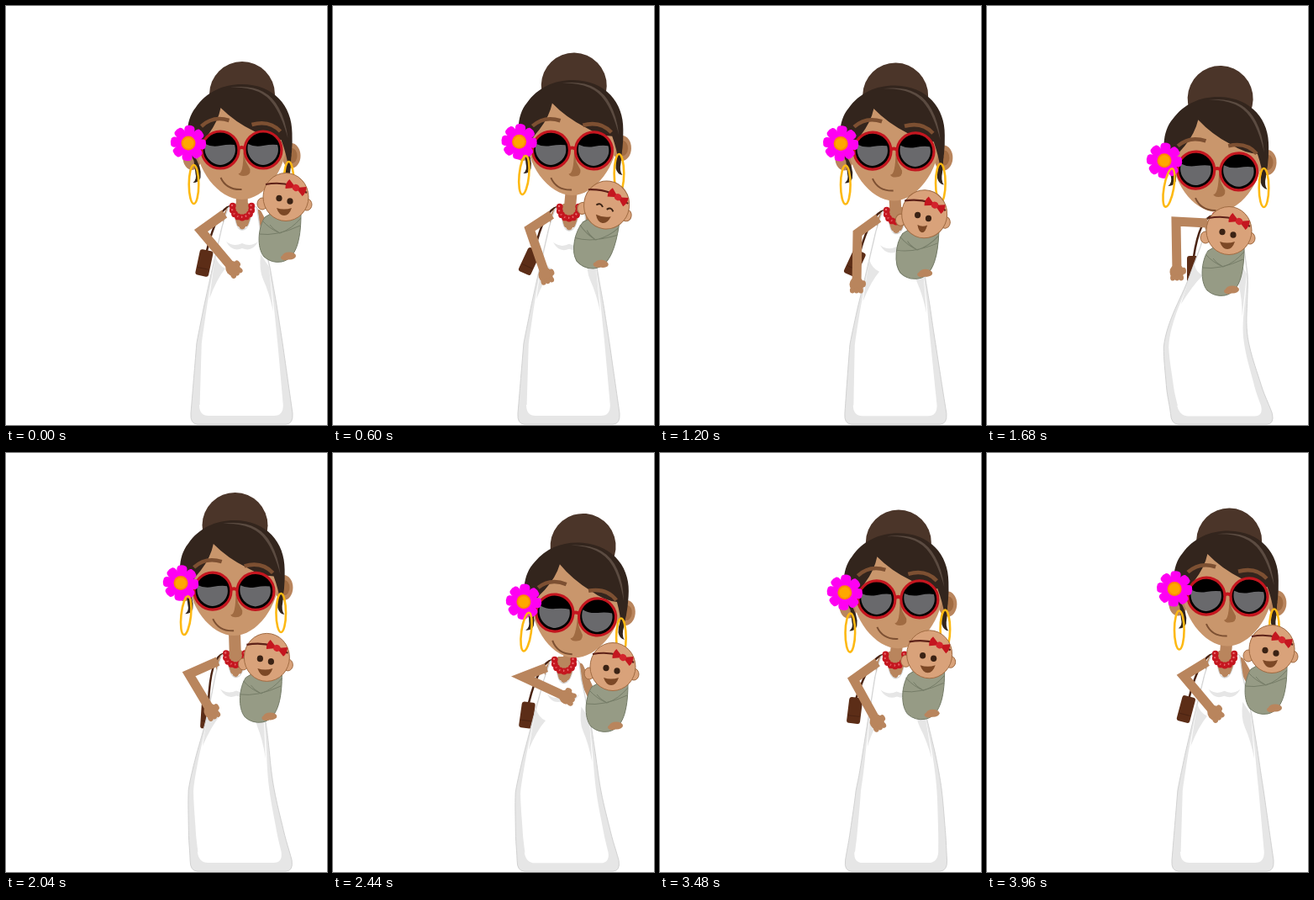
Write an HTML page with a canvas that moves like this. It is 382x498 px and loops after 4 s.

```html
<!DOCTYPE html>
<html lang="en">
<head>
<meta charset="utf-8">
<title>Dancing mother and baby</title>
<style>
  html, body { margin: 0; width: 100%; height: 100%; overflow: hidden; background: #fff; }
  canvas { display: block; }
</style>
</head>
<body>
<canvas id="stage" width="382" height="498"></canvas>
<script>
const ctx = document.getElementById('stage').getContext('2d');
const LOOP = 4000, STEP = 40, RAD = Math.PI / 180;

const SKIN = '#c9966c', ARM = '#b9855d', SHADE = '#a06b42', BROW = '#7d5032';
const HAIR = '#33251d', BUN = '#4b3529', RED = '#c4161f', GOLD = '#fdb913';
const GREY = '#e6e6e6', EDGE = '#d2d2d2', BAG = '#5c2d17', BABY = '#d9a27a';

// time, eyes x, eyes y, tilt, nod
const headKeys = loop([
  [0, 280.5, 171, 0, 0], [100, 279, 172, 0, 0], [600, 285, 171.5, 1, 5.5],
  [880, 300, 172, 2, 3], [1200, 278.5, 172.5, 1, 0], [1440, 264, 180, 1, 5],
  [1680, 274.5, 196, 2, 10], [1960, 270, 162, 0, 6], [2440, 290, 192.5, 5.5, 8],
  [2700, 282, 172, 3, 4], [3040, 248, 172, 4.5, 0], [3220, 262, 166, 2, 4],
  [3400, 280, 174, 0, 1], [3800, 291, 172, 0, 0], [3960, 286.5, 170.5, 1, 0]
]);
// time, shoulder dx, shoulder dy, waist dx, hip dx
const bodyKeys = loop([
  [0, 0, 0, 0, 0], [600, 0, 1, 0, 0], [880, 14, 0, 5, 4], [1200, 0, 5, 0, -1],
  [1440, -8, 8, -5, -6], [1680, 2, 11, -4, -17], [1960, -8, 0, -6, -10],
  [2440, -6, 8, -8, -10], [2700, -10, 3, 0, 2], [3040, -32, 3, 5, 17],
  [3400, -4, 2, 3, 8], [3800, 5, 1, 1, 1], [3960, 2, 1, 1, 0]
]);
// time, x, y, tilt
const babyKeys = loop([
  [0, 326, 275, 0], [600, 312, 283, 8], [880, 343, 278, 2], [1200, 306, 295, 2],
  [1440, 292, 305, 0], [1680, 281, 315, 0], [1960, 298, 290, 0], [2440, 326, 302, 0],
  [2700, 300, 295, 0], [3040, 257, 302, 0], [3400, 305, 290, 0], [3800, 338, 279, 0],
  [3960, 332, 281, 0]
]);
// time, elbow x, elbow y, hand x, hand y
const armKeys = loop([
  [0, 232, 267, 270, 312], [600, 234, 265, 253, 320], [880, 248, 268, 258, 322],
  [1200, 235, 270, 234, 331], [1440, 218, 268, 222, 330], [1680, 225, 256, 226, 316],
  [1960, 217, 262, 238, 310], [2440, 226, 266, 278, 290], [2700, 217, 272, 262, 310],
  [3040, 207, 276, 230, 332], [3400, 229, 270, 255, 322], [3960, 234, 265, 271, 309]
]);
// time, x, y, tilt
const bagKeys = loop([
  [0, 236, 305, 12], [600, 234, 303, 25], [1200, 232, 305, 25], [1680, 246, 312, 0],
  [2440, 231, 311, 8], [3040, 227, 308, 0], [3960, 237, 304, 15]
]);
const leftEdge = [[240, 264], [262, 257], [310, 246], [355, 236], [400, 227], [484, 220]];
const rightEdge = [[240, 299], [262, 302], [310, 314], [355, 322], [400, 329], [484, 341]];

function loop(rows) {
  const shift = (row, by) => [row[0] + by, ...row.slice(1)];
  return [...rows.slice(-2).map(r => shift(r, -LOOP)), ...rows,
          ...rows.slice(0, 2).map(r => shift(r, LOOP))];
}

// Cubic through the keys that never overshoots.
function sample(rows, t, col) {
  const last = rows.length - 1;
  if (t <= rows[0][0]) return rows[0][col];
  if (t >= rows[last][0]) return rows[last][col];
  let i = 0;
  while (rows[i + 1][0] <= t) i++;
  const slope = k => (rows[k + 1][col] - rows[k][col]) / (rows[k + 1][0] - rows[k][0]);
  const tangent = k => {
    if (k < 1 || k >= last) return 0;
    const a = slope(k - 1), b = slope(k);
    return a * b <= 0 ? 0 : 2 * a * b / (a + b);
  };
  const w = rows[i + 1][0] - rows[i][0], u = (t - rows[i][0]) / w, v = 1 - u;
  return rows[i][col] * v * v * (1 + 2 * u) + rows[i + 1][col] * u * u * (3 - 2 * u)
       + w * u * v * (tangent(i) * v - tangent(i + 1) * u);
}
const pose = (rows, t) => rows[0].slice(1).map((_, i) => sample(rows, t, i + 1));

function paint(fill, stroke, width = 1) {
  if (fill) { ctx.fillStyle = fill; ctx.fill(); }
  if (stroke) { ctx.strokeStyle = stroke; ctx.lineWidth = width; ctx.stroke(); }
}
function oval(x, y, rx, ry, fill, stroke, width, tilt = 0) {
  ctx.beginPath();
  ctx.ellipse(x, y, rx, ry, tilt * RAD, 0, 7);
  paint(fill, stroke, width);
}
function shape(d, fill, stroke, width) {
  const p = new Path2D(d);
  if (fill) { ctx.fillStyle = fill; ctx.fill(p); }
  if (stroke) { ctx.strokeStyle = stroke; ctx.lineWidth = width; ctx.stroke(p); }
}
function line(points, color, width) {
  ctx.beginPath();
  points.forEach(p => ctx.lineTo(...p));
  paint(null, color, width);
}
function at(x, y, tilt, draw) {
  ctx.save();
  ctx.translate(x, y);
  ctx.rotate(tilt * RAD);
  draw();
  ctx.restore();
}

function edgeX(edge, y) {
  let i = 0;
  while (i < edge.length - 2 && edge[i + 1][0] < y) i++;
  const [y0, x0] = edge[i], [y1, x1] = edge[i + 1];
  return x0 + (x1 - x0) * (y - y0) / (y1 - y0);
}

function drawDress([n, ny, waist, hip]) {
  const bend = [[245, n], [310, waist], [390, hip], [450, hip * .55], [498, 0]];
  const P = (x, y) => [x + sample(bend, y, 1), y + ny * Math.min(1, (498 - y) / 250)];
  const to = (x, y) => ctx.lineTo(...P(x, y));
  const quad = (cx, cy, x, y) => ctx.quadraticCurveTo(...P(cx, cy), ...P(x, y));
  const side = (edge, from, end, inset) => {
    const dir = Math.sign(end - from), count = Math.round(Math.abs(end - from) / 6);
    for (let i = 0; i <= count; i++) {
      const y = from + dir * Math.abs(end - from) * i / count;
      to(edgeX(edge, y) + inset(y), y);
    }
  };
  const none = () => 0;

  ctx.beginPath();
  to(267, 238); to(271, 243);
  quad(273, 266, 281, 266);
  quad(290, 266, 293, 243);
  to(297, 238);
  side(rightEdge, 240, 484, none);
  quad(342, 497, 333, 497);
  to(228, 497);
  quad(219, 497, 220, 484);
  side(leftEdge, 484, 240, none);
  ctx.closePath();
  paint(GREY, EDGE, 1);

  const inset = y => 1 + 9 * Math.max(0, (y - 310) / 168);
  ctx.beginPath();
  to(267, 239); to(271, 244);
  quad(273, 267, 281, 267);
  quad(290, 267, 293, 244);
  to(297, 239);
  side(rightEdge, 244, 474, y => -inset(y));
  quad(330, 487, 319, 487);
  to(241, 487);
  quad(230, 487, 230, 474);
  side(leftEdge, 474, 244, inset);
  ctx.closePath();
  paint('#fff');

  ctx.beginPath();
  to(249, 297); quad(252, 308, 261, 312); quad(251, 324, 242, 348);
  ctx.closePath(); paint(GREY);
  ctx.beginPath();
  to(303, 295); quad(301, 314, 306, 325); quad(313, 340, 318, 363); to(313, 310);
  ctx.closePath(); paint(GREY);
  ctx.beginPath();
  to(262, 280); quad(271, 287, 281, 282); quad(291, 287, 300, 280);
  quad(293, 293, 281, 288); quad(269, 293, 262, 280);
  paint(GREY);
}

function drawBag([x, y, tilt], sx, sy) {
  const top = [x + 14 * Math.sin(tilt * RAD), y - 14 * Math.cos(tilt * RAD)];
  ctx.beginPath();
  ctx.moveTo(sx, sy);
  ctx.quadraticCurveTo(sx - 16, sy + 3, ...top);
  paint(null, '#4a2413', 2.5);
  at(x, y, tilt, () => {
    ctx.beginPath();
    ctx.roundRect(-8, -15, 16, 31, 3);
    paint(BAG);
    line([[-7, 7], [7, 7]], '#4a2413', 1);
  });
}

function drawChest(n, ny, neckTop) {
  const x = 281 + n, y = 238 + ny;
  line([[x, y + 10], neckTop], ARM, 14);
  at(x, y, 0, () =>
    shape('M-7-4 Q-10 1-18 2 L-24 12 L-22 24 H21 L23 12 L18 2 Q10 1 7-4Z M-12 10 L0 31 L13 10Z', ARM));
}

function drawNecklace(n, ny) {
  at(281 + n, 238 + ny, 0, () => {
    for (let i = 0; i < 9; i++) {
      const a = (-12 + i * 25.5) * RAD, x = 11.5 * Math.cos(a), y = 2 + 11.5 * Math.sin(a);
      oval(x, y, 3.9, 3.9, RED);
      oval(x - .7, y - .7, 1.2, 1.2, '#e8666b');
    }
  });
}

function drawArm([ex, ey, hx, hy], sx, sy) {
  ctx.lineJoin = 'miter';
  line([[sx, sy], [ex, ey], [hx, hy]], ARM, 11);
  const tilt = Math.atan2(hy - ey, hx - ex) / RAD;
  at(hx, hy, tilt, () => {
    oval(0, 0, 9, 8.5, ARM);
    for (let i = -1; i < 2; i++) oval(7, i * 5, 3.5, 3, ARM);
    oval(-1, -8, 4, 3, ARM);
  });
}

function drawFlower(x, y) {
  at(x, y, 0, () => {
    for (let i = 0; i < 8; i++)
      at(0, 0, i * 45 + 5, () => shape('M0 0 C-4-5-9-18-4-20.5 Q0-22 4-20.5 C9-18 4-5 0 0Z', '#ff00f2'));
    oval(0, 0, 8.5, 8.5, '#ff8a00');
    oval(0, 0, 6.5, 6.5, '#ffa800');
  });
}

function drawLens(x) {
  ctx.save();
  oval(x, 0, 22, 22, '#000');
  ctx.clip();
  at(x, 0, 0, () => shape('M-18-7 Q-10-3 0-5 Q10-7 17-6 C21 6 12 17 0 18 C-12 17-21 6-18-7Z', '#69696c'));
  ctx.restore();
  oval(x, 0, 22, 22, null, RED, 3.2);
}

function drawHead([x, y, tilt, nod]) {
  at(x, y - nod, tilt, () => {
    const earY = 7 - nod * .9;
    oval(.5, -66 - nod, 39, 39, BUN);
    oval(59, earY, 11, 15, ARM);
    oval(60, earY, 6, 9, SHADE);
    oval(-59, earY + 2, 11, 15, ARM);
    at(0, -nod * .9, 0, () => {
      shape('M-58 5 Q-47 20-49 33 Q-51 39-58 39 Q-53 35-55 28Z', HAIR);
      shape('M59 5 Q50 20 52 31 Q54 38 60 39 Q56 34 58 24Z', HAIR);
    });

    const face = new Path2D('M-55-15 C-56 24-27 59 0 59 C27 59 54 24 54-15 C50-78-50-78-55-15Z');
    ctx.fillStyle = SKIN;
    ctx.fill(face);
    ctx.save();
    ctx.clip(face);
    ctx.translate(0, nod);
    shape('M2 2 L5 14 L10 23 Q11 31 2 31 Q-3 31-4 28 Q2 29 2 2Z', SHADE);
    shape('M-25 33 Q-18 48 0 47', null, BROW, 2);
    ctx.restore();

    shape('M-57 13 C-67-8-68-34-55-50 C-42-69-22-78 0-78 C38-78 60-52 60-20 Q61 4 56 22 Q53 4 47-12'
        + ' Q32-12 15-22 Q-8-33-25-50 Q-28-34-40-18 Q-52-5-57 13Z', HAIR);
    shape('M-14-74 Q28-80 44-50 Q52-36 55-14 Q47-42 37-55 Q22-76-14-74Z', '#5b4b41');

    at(0, nod, 0, () => {
      shape('M-48-28 Q-34-41-15-35', null, BROW, 4.5);
      shape('M12-30 Q33-36 46-22', null, BROW, 4.5);
      shape('M-5-1 Q0-5 5-1', null, RED, 4);
      drawLens(-25.5);
      drawLens(25.5);
    });
    at(-63.5, -8 + nod * .8, -tilt, () => drawFlower(0, 0));
    at(-57, 41 - nod * .9, nod - tilt, () => oval(0, 0, 5.8, 23, null, GOLD, 2.6));
    at(56, 37 - nod * .9, -tilt, () => oval(0, 0, 5.8, 23, null, GOLD, 2.6));
  });
}

function drawBaby([x, y, tilt], t) {
  const blink = Math.abs(t - 600) < 90;
  const small = Math.max(0, 1 - Math.abs(t - 1200) / 240);
  at(x, y, tilt, () => {
    shape('M-18-24 C-26-12-28 12-19 23 Q-10 31 2 29 C22 25 25-4 25-29 Q0-38-18-24Z', '#969b85', '#747b67', 1);
    shape('M-21-20 Q-12-10 0-5 Q14-10 25-23 M-25-4 Q-4-1 24-14 M0-5 Q-9-10-12-15', null, '#767d68', 1);
    oval(11, 22, 8, 4.5, ARM);
    oval(6, 24, 5, 3.2, ARM);
    oval(-21, -40, 6, 7, BABY, SHADE, 1);
    oval(32, -39, 6, 7, BABY, SHADE, 1);
    oval(7, -48, 27, 28.5, BABY, SHADE, 1);
    shape('M-17-63 Q10-68 32-53', null, '#5d2118', 2.2);
    at(19, -59, 24, () => {
      shape('M0 0 L-11-6 Q-14 0-11 6Z M0 0 L11-6 Q14 0 11 6Z', RED);
      oval(0, 0, 4, 4, '#d3242c');
    });
    for (const [ex, ey] of [[-1, -46.5], [12, -43]]) {
      if (blink) at(ex, ey, 10, () => shape('M-4 1 Q0-4 4 1', null, '#3a2214', 2));
      else oval(ex, ey, 3.6, 3.8, '#3a2214');
    }
    ctx.save();
    ctx.translate(5, -34);
    ctx.scale(1 - small * .35, 1);
    shape('M-9-1 Q0 2 9-1 Q6 8 0 8 Q-6 8-9-1Z', '#7c4826');
    ctx.restore();
  });
}

function render(t) {
  ctx.fillStyle = '#fff';
  ctx.fillRect(0, 0, 382, 498);
  const head = pose(headKeys, t), body = pose(bodyKeys, t), baby = pose(babyKeys, t);
  const [n, ny] = body;
  drawBag(pose(bagKeys, t), 267 + n, 238 + ny);
  ctx.lineCap = 'round';
  line([[299 + n, 247 + ny], [baby[0] - 8, baby[1] + 8]], ARM, 11);
  ctx.lineCap = 'butt';
  drawChest(n, ny, [head[0], head[1] - head[3] + 40]);
  drawDress(body);
  drawNecklace(n, ny);
  drawArm(pose(armKeys, t), 260 + n, 247 + ny);
  drawHead(head);
  drawBaby(baby, t);
}

const start = performance.now();
function tick() {
  const t = (performance.now() - start) % LOOP;
  render(Math.floor(t / STEP) * STEP);
  requestAnimationFrame(tick);
}
tick();
</script>
</body>
</html>
```
